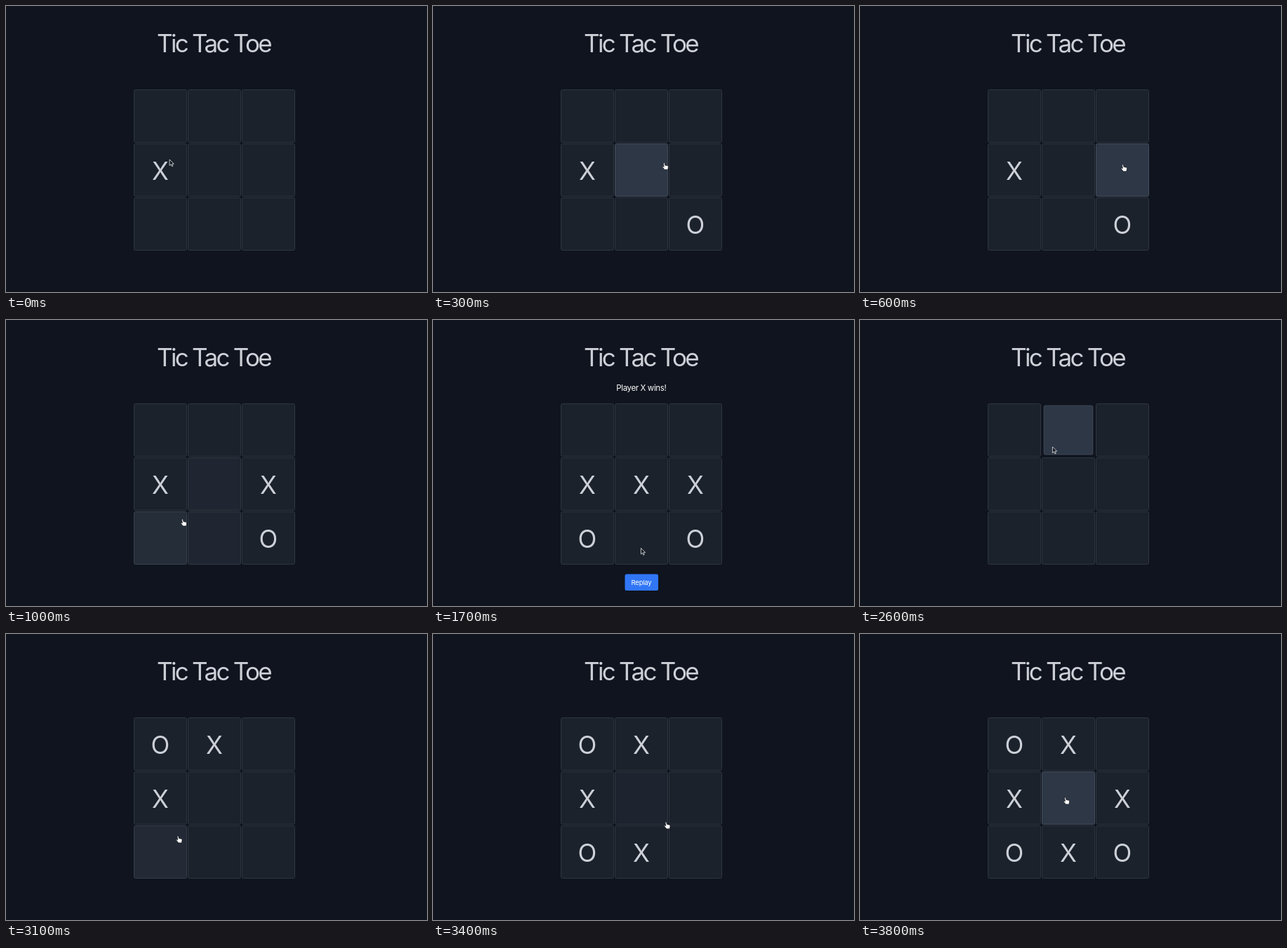
Write an HTML page that moves like this. It is 600 px wide and 408 px high and loops after 3900 ms.

```html
<!DOCTYPE html>
<html lang="en">
<head>
<meta charset="utf-8">
<title>Tic Tac Toe</title>
<style>
  html, body { margin: 0; width: 100%; height: 100%; overflow: hidden; background: #0f141e; }
  svg { display: block; }
  text { font-family: Inter, "Liberation Sans", sans-serif; font-optical-sizing: none; text-anchor: middle; fill: #fff; }
  .title, .mark { font-size: 35px; font-weight: 440; fill: #cdd0d7; }
  .title { letter-spacing: -2.7px; }
  .message { font-size: 11.5px; letter-spacing: -.38px; }
  .label { font-size: 9.6px; letter-spacing: -.25px; }
</style>
</head>
<body>
<svg width="600" height="408" viewBox="0 0 600 408">
  <text class="title" x="296" y="66">Tic Tac Toe</text>
  <g id="board"></g>
  <g id="result">
    <text class="message" x="296.8" y="101.3">Player X wins!</text>
    <rect id="button" x="273.5" y="362.5" width="47.5" height="23.5" rx="2.5"/>
    <text class="label" x="297" y="377.8">Replay</text>
  </g>
  <g id="cursor" stroke-linejoin="round">
    <path id="arrow" fill="#10131a" stroke="#e8eaee" stroke-width=".8"
      d="M.4 .4v8.6l2-1.8 1.4 3.1 1.4-.6-1.4-3h2.8z"/>
    <path id="hand" fill="#fff" stroke="#10131a" stroke-width=".7"
      d="M-1 .9c0-1.2 1.7-1.2 1.9 0l.5 2.6 3.4.7c1 .2 1.4.8 1.2 1.9l-.6 3.8h-4.6l-2.9-3.6c-.6-.9.5-1.7 1.3-1l.7.7z"/>
  </g>
</svg>
<script>
const LOOP = 3900, STEP = 100, FADE = 100, REPLY = 200;
const SIZE = 75, PITCH = 77, LEFT = 182.5, TOP = 119.5;
const WIN = 1500, RESET = 2100;

// Pointer rests; one with a reply is a click on leaving, answered by O in that cell
const rests = [
  { arrive: -100, leave: -100, x: 231, y: 218.5, reply: 8 },
  { arrive: 600, leave: 800, x: 374.5, y: 226, reply: 6 },
  { arrive: 1000, leave: 1000, x: 251.5, y: 284 },
  { arrive: 1300, leave: 1400, x: 296, y: 240, reply: null },
  { arrive: 1700, leave: 1800, x: 296, y: 325 },
  { arrive: 2000, leave: 2300, x: 296, y: 370 },
  { arrive: 2500, leave: 2600, x: 274, y: 180.5, reply: 0 },
  { arrive: 2900, leave: 3000, x: 228, y: 215, reply: 6 },
  { arrive: 3100, leave: 3100, x: 245, y: 288 },
  { arrive: 3200, leave: 3300, x: 296, y: 300, reply: 8 },
  { arrive: 3500, leave: 3600, x: 368, y: 236, reply: null },
  { arrive: 3800, leave: LOOP, x: 292.5, y: 233 }
];

const $ = id => document.getElementById(id);
const show = (el, on) => el.setAttribute('visibility', on ? 'visible' : 'hidden');
const mix = (a, b, k) => `rgb(${a.map((v, i) => Math.round(v + (b[i] - v) * k))})`;
const ease = k => k < .5 ? 4 * k ** 3 : 1 - 4 * (1 - k) ** 3;
const inside = (cell, p) =>
  p.x >= cell.x && p.x <= cell.x + SIZE && p.y >= cell.y && p.y <= cell.y + SIZE;

function add(parent, name, attrs = {}) {
  const el = document.createElementNS('http://www.w3.org/2000/svg', name);
  for (const key in attrs) el.setAttribute(key, attrs[key]);
  return parent.appendChild(el);
}

const cells = Array.from({ length: 9 }, (_, i) => {
  const x = LEFT + i % 3 * PITCH, y = TOP + Math.floor(i / 3) * PITCH;
  const group = add($('board'), 'g');
  const box = add(group, 'rect', { x, y, width: SIZE, height: SIZE, rx: 2 });
  const mark = add(group, 'text', { class: 'mark', x: x + SIZE / 2, y: y + SIZE / 2 + 13.5 });
  return { x, y, group, box, mark };
});

const moves = rests.filter(r => r.reply !== undefined).flatMap(r => {
  const at = r.leave + STEP;
  const cell = cells.findIndex(c => inside(c, r));
  return [{ cell, at, mark: 'X' }, { cell: r.reply, at: at + REPLY, mark: 'O' }];
});

function pointer(t) {
  const next = rests.findIndex(r => r.leave >= t);
  const to = rests[next], from = rests[next - 1];
  if (!from || t >= to.arrive) return to;
  const k = ease((t - from.leave) / (to.arrive - from.leave));
  return { x: from.x + (to.x - from.x) * k, y: from.y + (to.y - from.y) * k };
}

// Share of the recent past that the pointer spent over the cell
function heat(cell, t) {
  const samples = 10;
  let hits = 0;
  for (let k = 0; k < samples; k++) hits += inside(cell, pointer(t - k * FADE / samples));
  return hits / samples;
}

function draw(t) {
  const tip = pointer(t);
  const over = t >= WIN && t < RESET;
  const onButton = over && tip.y > 362;
  const round = moves.filter(m => m.at < RESET === t < RESET);
  let clickable = onButton;

  cells.forEach((cell, i) => {
    const move = round.find(m => m.cell === i && t >= m.at);
    const pressed = round.some(m => m.cell === i && m.mark === 'X' && t < m.at && t >= m.at - STEP);
    const open = !move && !over;
    const glow = !open ? 0 : pressed ? 1 : heat(cell, t);
    const cx = cell.x + SIZE / 2, cy = cell.y + SIZE / 2;
    if (open && !pressed && inside(cell, tip)) clickable = true;
    cell.mark.textContent = move ? move.mark : '';
    cell.box.setAttribute('fill', mix([27, 34, 44], [46, 55, 69], glow));
    cell.box.setAttribute('stroke', mix([47, 54, 64], [67, 77, 92], glow));
    cell.group.setAttribute('transform',
      `translate(${cx} ${cy}) scale(${pressed ? .93 : 1}) translate(${-cx} ${-cy})`);
  });

  show($('result'), over);
  $('button').setAttribute('fill', onButton ? '#2b66da' : '#3076f6');
  show($('arrow'), !clickable);
  show($('hand'), clickable);
  $('cursor').setAttribute('transform', `translate(${tip.x} ${tip.y})`);
}

const start = performance.now();
function tick() {
  const t = (performance.now() - start) % LOOP;
  draw(Math.floor(t / STEP) * STEP);
  requestAnimationFrame(tick);
}
tick();
</script>
</body>
</html>
```
